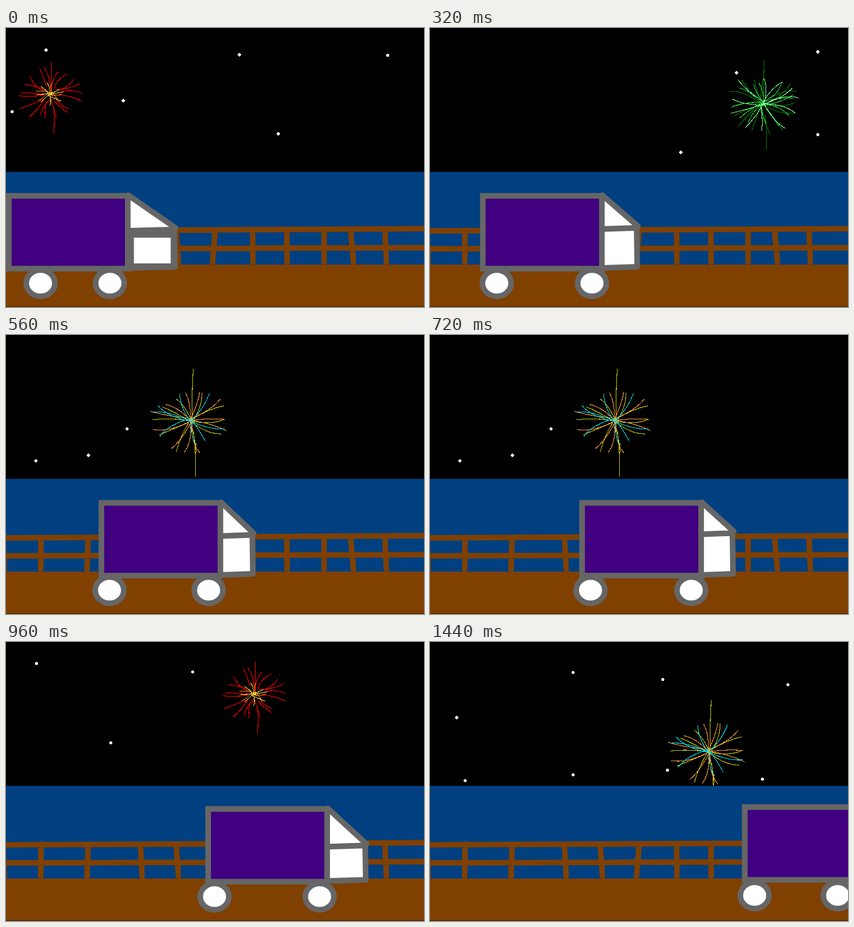
Animation, 720 px wide and 480 px high, one loop 1680 ms. Source, as an HTML page:

```html
<!DOCTYPE html>
<html lang="en">
<head>
<meta charset="utf-8">
<title>Night drive</title>
<style>
  html, body { margin: 0; width: 100%; height: 100%; overflow: hidden; background: #000; }
  svg { display: block; width: 100vw; height: 100vh; }
  path, rect, ellipse { stroke-linecap: round; stroke-linejoin: round; }
  #sky { shape-rendering: crispEdges; }
</style>
</head>
<body>
<svg viewBox="0 0 720 480">
  <rect width="720" height="480"/>
  <g id="sky"></g>
  <rect y="247.5" width="720" height="165" fill="#004080"/>
  <rect y="407" width="720" height="73" fill="#804000"/>
  <rect y="479" width="720" height="1" fill="#402000"/>
  <path id="fence" fill="none" stroke="#804000" stroke-width="9.5"/>
  <g id="truck"></g>
</svg>
<script>
const LOOP = 1680, STEP = 240;
const $ = id => document.getElementById(id);

function seeded(seed) {
  return () => {
    seed = (seed * 1664525 + 1013904223) % 4294967296;
    return seed / 4294967296;
  };
}

// Fence posts: middle x and sideways lean
const posts = [[-4, 2], [60, -0.5], [140.5, -2], [233, 3], [295, 4], [358, -4.5],
  [425, 0.5], [484, 0.5], [548, 0], [596, 5], [654, 2.5]];
$('fence').setAttribute('d', 'M-5 349Q300 346.5 725 345.3M-5 380L725 378' +
  posts.map(([x, lean]) => `M${x - lean / 2} 348L${x + lean / 2} 403`).join(''));

// Layers: colour, ray count, reach as a share of the burst, share left empty at the hub
const bursts = {
  red: { rx: 60, ry: 50, up: 56, down: 68, tail: '#f00', layers: [
    ['#f00', 19, 1, 0.25], ['#ff8020', 5, 0.42, 0], ['#ffe040', 8, 0.42, 0]] },
  green: { rx: 70, ry: 55, up: 74, down: 79, tail: '#008000', layers: [
    ['#008000', 14, 1, 0], ['#20e040', 12, 0.85, 0], ['#80ff90', 11, 1, 0]] },
  mixed: { rx: 76, ry: 60, up: 88, down: 96, tail: '#c8c800', layers: [
    ['#c8c800', 10, 0.95, 0], ['#ff9a40', 11, 1, 0], ['#00e0f0', 8, 0.92, 0]] }
};

const skies = [
  { at: 0, kind: 'red', hub: [76, 114],
    stars: [[69, 38], [402, 46], [657.5, 47], [202, 125], [10.5, 144], [469, 182]] },
  { at: 320, kind: 'green', hub: [572, 130],
    stars: [[668, 41], [528, 77], [668, 183.5], [432, 214]] },
  { at: 560, kind: 'mixed', hub: [318, 147],
    stars: [[208.5, 161.5], [142, 207], [51.5, 216.5]] },
  { at: 880, kind: 'red', hub: [427, 90],
    stars: [[52.5, 37], [321.5, 51.5], [180.5, 173.5]] },
  { at: 1200, kind: 'red', hub: [160, 96],
    stars: [[361, 51], [545, 63.5], [690, 68], [507, 112.5], [235, 110], [369, 131.5], [235, 169.5]] },
  { at: 1440, kind: 'mixed', hub: [480, 188.5],
    stars: [[246.5, 52.5], [401, 64.5], [616.5, 73.5], [46, 130], [60.5, 238.5],
      [246.5, 228.5], [409, 220.5], [572.5, 236]] }
];

// x of the box, wheel offsets from it, cab length and height of the cab's middle bar
const trucks = [
  { x: 4.8, wheels: [54.7, 174.2], cab: 80, bar: 58, framed: true },
  { x: 91, wheels: [24, 188], cab: 60, bar: 55 },
  { x: 164.3, wheels: [14, 184.7], cab: 55, bar: 55 },
  { x: 262, wheels: [14.5, 188], cab: 54, bar: 52 },
  { x: 348.2, wheels: [11, 192], cab: 65.5, bar: 63 },
  { x: 431.2, wheels: [18, 187], cab: 67, bar: 53 },
  { x: 542.2, wheels: [17, 160], cab: 60, bar: 55 }
];

const BOX = 205, HEIGHT = 125.2;
const line = 'stroke="#666" stroke-width="9.7"';
const stroke = (d, color) => `<path d="${d}" fill="none" stroke="${color}" stroke-width="1.1"/>`;

function burstMarkup(kind, [hx, hy]) {
  const { rx, ry, up, down, tail, layers } = bursts[kind];
  const random = seeded(kind.length * 97);
  const spread = size => (random() - 0.5) * size;
  const rays = layers.map(([color, count, reach, gap]) => {
    let d = '';
    for (let i = 0; i < count; i++) {
      const angle = (i + spread(0.8)) / count * 2 * Math.PI;
      const size = reach * (0.72 + 0.28 * random());
      const dx = Math.cos(angle) * rx * size, dy = Math.sin(angle) * ry * size;
      const bend = spread(0.4);
      const sx = hx + dx * gap + spread(8), sy = hy + dy * gap + spread(8);
      d += `M${sx} ${sy}Q${hx + dx * 0.6 - dy * bend} ${hy + dy * 0.6 + dx * bend} ${hx + dx} ${hy + dy}`;
    }
    return stroke(d, color);
  });
  const tails = `M${hx + up * 0.05} ${hy - up}Q${hx + 2} ${hy - up / 2} ${hx + 2} ${hy}` +
    `M${hx + 5} ${hy + 20}Q${hx + 9} ${hy + down / 2} ${hx + down * 0.09} ${hy + down}`;
  return stroke(tails, tail) + rays.join('');
}

function skyMarkup({ kind, hub, stars }) {
  return burstMarkup(kind, hub) +
    stars.map(([x, y]) => `<circle cx="${x}" cy="${y}" r="2.6" fill="#fff"/>`).join('');
}

function truckMarkup({ x, wheels, cab, bar, framed }, index) {
  const rise = Math.max(0, index - 3); // the last poses climb a little
  const y = 288.8 - 1.6 * rise;
  const left = x + BOX, right = left + cab, mid = y + bar, floor = y + 124;
  const outline = `M${left + 1} ${y - 1}L${right + 2} ${mid - 3}L${right} ${mid}L${right + 1} ${floor - 2}L${left} ${floor}`;
  const frame = framed
    ? `<rect x="${left + 5.7}" y="${mid + 9}" width="${cab - 7}" height="54" fill="none" ${line}/>` : '';
  return `<path d="${outline}M${left} ${mid + 2}L${right} ${mid}" fill="#fff" ${line}/>` + frame +
    `<rect x="${x}" y="${y}" width="${BOX}" height="${HEIGHT}" fill="#400080" ${line} style="stroke-linejoin:miter"/>` +
    wheels.map(offset =>
      `<ellipse cx="${x + offset}" cy="${439 - rise}" rx="24.7" ry="22.7" fill="#fff" ${line}/>`).join('');
}

let shownSky, shownTruck;
function draw() {
  const t = performance.now() % LOOP;
  const sky = skies.findLast(s => s.at <= t);
  const index = Math.floor(t / STEP);
  if (sky !== shownSky) $('sky').innerHTML = skyMarkup(shownSky = sky);
  if (index !== shownTruck) $('truck').innerHTML = truckMarkup(trucks[shownTruck = index], index);
  requestAnimationFrame(draw);
}
draw();
</script>
</body>
</html>
```
